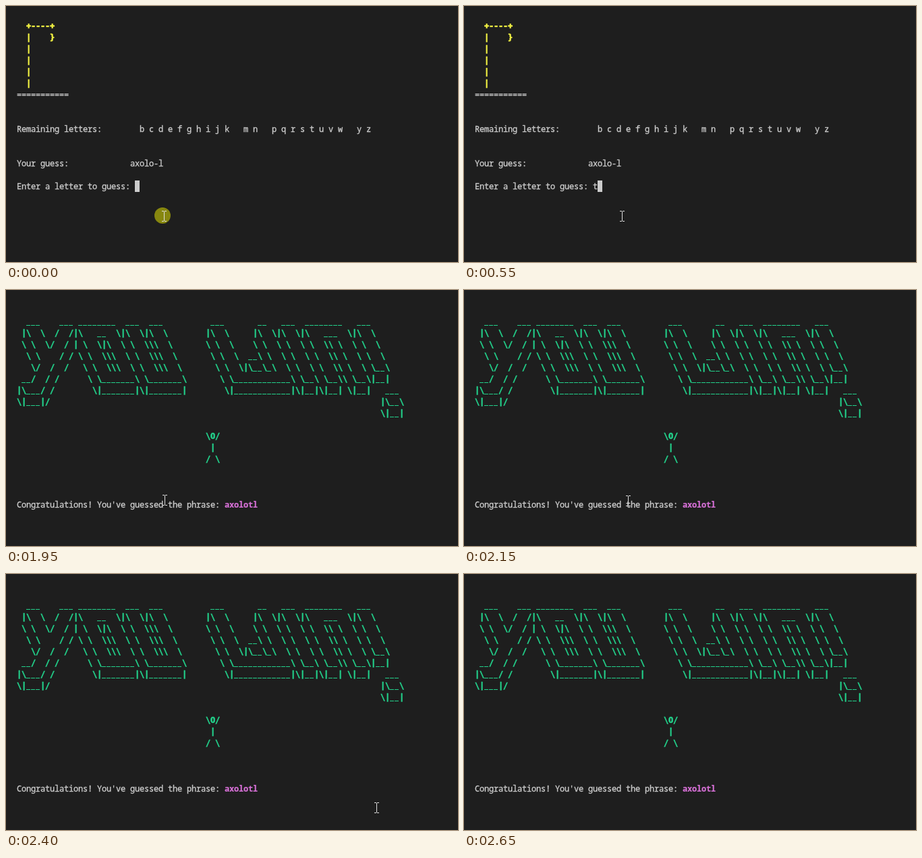
Write an HTML page with a canvas that moves like this. It is 670 by 380 pixels and loops after 3000 ms.

```html
<!DOCTYPE html>
<html lang="en">
<head>
<meta charset="utf-8">
<title>Hangman in the terminal</title>
<style>
  html, body { margin: 0; width: 100%; height: 100%; overflow: hidden; background: #1e1e1e; }
  canvas { display: block; }
</style>
</head>
<body>
<canvas id="stage" width="670" height="380"></canvas>
<script>
const ctx = document.getElementById('stage').getContext('2d');

const LOOP = 3000, STEP = 50;
const LEFT = 16, TOP = 21, CELL_W = 7, CELL_H = 17, BASELINE = 13;
const GREY = '#cccccc', YELLOW = '#f5f543', GREEN = '#23d18b', PINK = '#d670d6';

// Each style has a font and a thin outline that adds weight
const TEXT = { font: '12px "Noto Sans Mono", monospace', outline: 0.35 };
const BOLD = { font: 'bold 12px "Noto Sans Mono", monospace', outline: 0.2 };
const ART = { font: 'bold 12px "DejaVu Sans Mono", monospace', outline: 0.6 };

const gallows = ['+----+', '|    }', '|', '|', '|', '|'];

const banner = String.raw`
  ___    ___ ________  ___  ___          ___       __   ___  ________   ___
 |\  \  /  /|\   __  \|\  \|\  \        |\  \     |\  \|\  \|\   ___  \|\  \
 \ \  \/  / | \  \|\  \ \  \\\  \       \ \  \    \ \  \ \  \ \  \\ \  \ \  \
  \ \    / / \ \  \\\  \ \  \\\  \       \ \  \  __\ \  \ \  \ \  \\ \  \ \  \
   \/  /  /   \ \  \\\  \ \  \\\  \       \ \  \|\__\_\  \ \  \ \  \\ \  \ \__\
 __/  / /      \ \_______\ \_______\       \ \____________\ \__\ \__\\ \__\|__|
|\___/ /        \|_______|\|_______|        \|____________|\|__|\|__| \|__|   ___
\|___|/                                                                      |\__\
                                                                             \|__|

                                        \O/
                                         |
                                        / \ `.split('\n');

const letters = [...'abcdefghijklmnopqrstuvwxyz']
  .map(c => 'alox'.includes(c) ? ' ' : c).join(' ');

// Pointer positions from 2150 ms on, one per step: stem x, top y
const sweep = [[243, 305], [263, 294], [326, 289], [424, 302], [510, 324], [549, 339],
               [549, 342], [548, 346], [546, 353], [545, 365]];

function print(row, col, text, color = GREY, style = TEXT) {
  const y = TOP + row * CELL_H + BASELINE;
  ctx.fillStyle = ctx.strokeStyle = color;
  ctx.font = style.font;
  ctx.lineWidth = style.outline;
  ctx.lineJoin = 'round';
  [...text].forEach((c, i) => {
    const x = LEFT + (col + i) * CELL_W;
    if (c === '_') {
      ctx.fillRect(x, y + 1, CELL_W - 1, 1); // underscores stay separate dashes
    } else if (c !== ' ') {
      ctx.fillText(c, x, y);
      ctx.strokeText(c, x, y);
    }
  });
}

function printLines(row, col, lines, color) {
  lines.forEach((line, i) => print(row + i, col, line, color, ART));
}

function drawGame(t) {
  const prompt = 'Enter a letter to guess: ' + (t < 550 ? '' : 't');
  printLines(0, 2, gallows, YELLOW);
  print(6, 0, '='.repeat(11));
  print(9, 0, 'Remaining letters:');
  print(9, 24, letters);
  print(12, 0, 'Your guess:');
  print(12, 24, 'axolo-l');
  print(14, 0, prompt);
  ctx.fillRect(LEFT + prompt.length * CELL_W, TOP + 14 * CELL_H, CELL_W, CELL_H);
}

function drawWin() {
  const message = "Congratulations! You've guessed the phrase: ";
  printLines(0, 0, banner, GREEN);
  print(17, 0, message);
  print(17, message.length, 'axolotl', PINK, BOLD);
}

function pointerAt(t) {
  if (t < 1950) return [234, 304];
  if (t < 2000) return [235, 304];
  if (t < 2150) return [239, 304];
  return sweep[Math.floor((t - 2150) / STEP)];
}

function drawPointer(t) {
  if (t < 50) {
    ctx.fillStyle = '#87870f';
    ctx.beginPath();
    ctx.arc(232, 311, 12, 0, 2 * Math.PI);
    ctx.fill();
  }
  const pos = pointerAt(t);
  if (!pos) return;
  const [x, y] = pos;
  ctx.fillStyle = '#e0e0e0';
  ctx.fillRect(x, y + 1, 1, 14);
  for (const edge of [y, y + 15]) {
    ctx.fillRect(x - 3, edge, 3, 1);
    ctx.fillRect(x + 1, edge, 3, 1);
  }
}

function frame() {
  const t = performance.now() % LOOP;
  ctx.fillStyle = '#1e1e1e';
  ctx.fillRect(0, 0, 670, 380);
  if (t < 1300) drawGame(t);
  else drawWin();
  drawPointer(t);
  requestAnimationFrame(frame);
}
frame();
</script>
</body>
</html>
```
